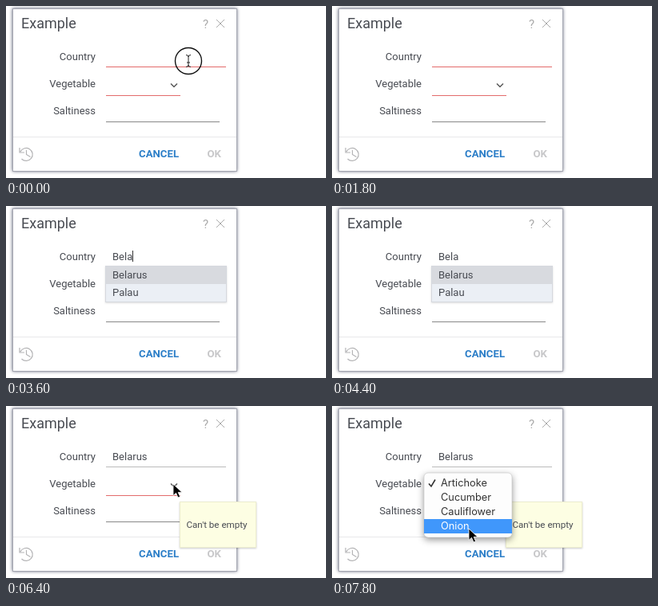
These frames come from a looping animation (400x216 px, 8 s). An HTML page:

```html
<!DOCTYPE html>
<html lang="en">
<head>
<meta charset="utf-8">
<title>Example form</title>
<style>
  html, body { margin: 0; width: 100%; height: 100%; overflow: hidden; background: #fff; }
  svg { display: block; width: 400px; height: 216px; font: 13px Roboto, sans-serif; fill: #484b52; }
  line, .stroke { fill: none; stroke-width: 1; }
  .label { text-anchor: end; }
  .button { font-weight: 700; font-size: 13.2px; }
  .dialog { filter: drop-shadow(0 0 2px #555a70); }
  .list { filter: drop-shadow(0 1px 1px #0002); }
  .tip { filter: drop-shadow(0 1px 1px #0003); }
  .menu { filter: drop-shadow(0 3px 4px #0006); }
  #menu text { font: 12.8px Inter, sans-serif; fill: #333; }
</style>
</head>
<body>
<svg viewBox="0 0 400 216">
  <rect class="dialog" x="8" y="3" width="280.5" height="204.5" fill="#fff"/>
  <rect class="stroke" x="8.5" y="3.5" width="280" height="204" stroke="#a3a5b0"/>
  <text x="19" y="28" font-size="18">Example</text>
  <text x="246" y="27.5" font-size="15" fill="#aaa">?</text>
  <path class="stroke" d="M263 17l10 10m0-10l-10 10" stroke="#aaa"/>

  <text class="label" x="112" y="68">Country</text>
  <text class="label" x="112" y="102">Vegetable</text>
  <text class="label" x="112" y="136">Saltiness</text>
  <text id="country" x="133" y="68"></text>
  <line id="caret" y1="56" y2="70" stroke="#333"/>
  <line id="countryLine" x1="125" x2="275" y1="76.5" y2="76.5"/>
  <line x1="125" x2="218" y1="112.5" y2="112.5" stroke="#e36b6b"/>
  <path class="stroke" d="M206 97.5l4 4 4-4" stroke="#555" style="stroke-width:1.4"/>
  <line x1="125" x2="267" y1="145.5" y2="145.5" stroke="#888"/>

  <line x1="9" x2="288" y1="164.5" y2="164.5" stroke="#e8e8ea"/>
  <g class="stroke" stroke="#b4b4b6">
    <path d="M18 183A8 8 0 1 1 19.5 192M17 178v6h6M25.500 181v5.500l5 3" style="stroke-width:1.2"/>
  </g>
  <text class="button" x="166" y="190" fill="#2d7fc8">CANCEL</text>
  <text class="button" x="251.500" y="190" fill="#c8c8ca">OK</text>

  <g id="list">
    <rect class="list" x="124.5" y="75.5" width="151" height="45" fill="#ebeff5" stroke="#d5d8de"/>
    <rect x="125" y="76" width="150" height="22" fill="#d8dadf"/>
    <text x="133" y="91">Belarus</text>
    <text x="133" y="112.500">Palau</text>
  </g>

  <g id="tip">
    <rect class="tip" x="217.500" y="120.500" width="95" height="57" fill="#fdfee3" stroke="#ecedcf"/>
    <text x="225.500" y="153" font-size="11.6">Can't be empty</text>
  </g>

  <g id="menu">
    <rect class="menu" x="115" y="84" width="110" height="81" rx="5" fill="#fdfdfd" stroke="#bbb" stroke-width=".5"/>
    <rect id="highlight" x="115" width="110" height="18" fill="#4097fb"/>
    <path id="check" class="stroke" d="M121 97.500l3 3.500 5-8.500" style="stroke-width:1.6"/>
  </g>

  <g id="pointer">
    <path id="arrow" d="M0 0V14.500L3.500 11.300 6 17 8.600 15.900 6.200 10.400H11Z" fill="#000" stroke="#fff" stroke-width=".8"/>
    <path id="beam" class="stroke" d="M-3-7.500Q0-7.500 0-5Q0-7.500 3-7.500M0-5V5M-3 7.500Q0 7.500 0 5Q0 7.500 3 7.500M-2 2H2" stroke="#222"/>
    <circle id="ring" class="stroke" r="16.500" stroke="#111" style="stroke-width:1.4"/>
  </g>
</svg>
<script>
const $ = id => document.getElementById(id);
const LOOP = 8000, STEP = 200;
const ROW_TOP = 88, ROW_HEIGHT = 18;

const typing = [[0, ''], [2200, 'B'], [2400, 'Be'], [2800, 'Bel'], [3000, 'Bela'], [4800, 'Belarus']];
const leaving = [[0, 228, 69], [200, 228, 69], [600, 252, 59], [800, 271, 44], [1200, 328, 16]];
const returning = [[6000, 270, 60], [6200, 230, 86], [6400, 209, 98], [6600, 200, 101],
  [6800, 193, 103], [7000, 191, 106], [7200, 186, 118], [7400, 181, 131], [7600, 175, 145], [7800, 171, 154]];

const items = ['Artichoke', 'Cucumber', 'Cauliflower', 'Onion'].map((name, i) => {
  const text = document.createElementNS('http://www.w3.org/2000/svg', 'text');
  text.textContent = name;
  text.setAttribute('x', 136);
  text.setAttribute('y', ROW_TOP + ROW_HEIGHT * i + 13);
  return $('menu').appendChild(text);
});

const within = (t, from, to) => t >= from && t < to;
const show = (id, visible) => { $(id).style.display = visible ? '' : 'none'; };

function position(path, t) {
  const next = path.findIndex(([time]) => time > t);
  if (next < 0) return path.at(-1).slice(1);
  const [t0, x0, y0] = path[next - 1], [t1, x1, y1] = path[next];
  const k = (t - t0) / (t1 - t0);
  return [x0 + (x1 - x0) * k, y0 + (y1 - y0) * k];
}

function drawField(t) {
  const text = typing.findLast(([time]) => time <= t)[1];
  const blinkOn = Math.floor(t / 600) % 2 === 0;
  const active = within(t, 2200, 5200);
  $('country').textContent = text;
  const caretX = Math.round(133 + $('country').getComputedTextLength()) + 0.5;
  $('caret').setAttribute('x1', caretX);
  $('caret').setAttribute('x2', caretX);
  show('caret', within(t, 1200, 5200) && (blinkOn || within(t, 2200, 3200)));
  $('countryLine').style.stroke = active ? '#189bdf' : text ? '#bbb' : '#e36b6b';
  $('countryLine').style.strokeWidth = active ? 1.7 : 1;
  show('list', within(t, 3200, 4800));
}

function drawMenu(t, pointerY) {
  const row = Math.max(0, Math.min(3, Math.floor((pointerY - ROW_TOP) / ROW_HEIGHT)));
  show('menu', t >= 6600);
  show('tip', t >= 6400);
  $('highlight').setAttribute('y', ROW_TOP + ROW_HEIGHT * row);
  $('check').style.stroke = row ? '#333' : '#fff';
  items.forEach((item, i) => { item.style.fill = i === row ? '#fff' : '#333'; });
}

function frame(now) {
  const t = Math.floor(now % LOOP / STEP) * STEP;
  const beam = t < 600;
  const [x, y] = position(t < 6000 ? leaving : returning, t);
  drawField(t);
  drawMenu(t, y);
  show('pointer', t < 1400 || t >= 6000);
  show('beam', beam);
  show('arrow', !beam);
  show('ring', t < 200);
  $('pointer').setAttribute('transform', `translate(${x} ${y})`);
  requestAnimationFrame(frame);
}
requestAnimationFrame(frame);
</script>
</body>
</html>
```
